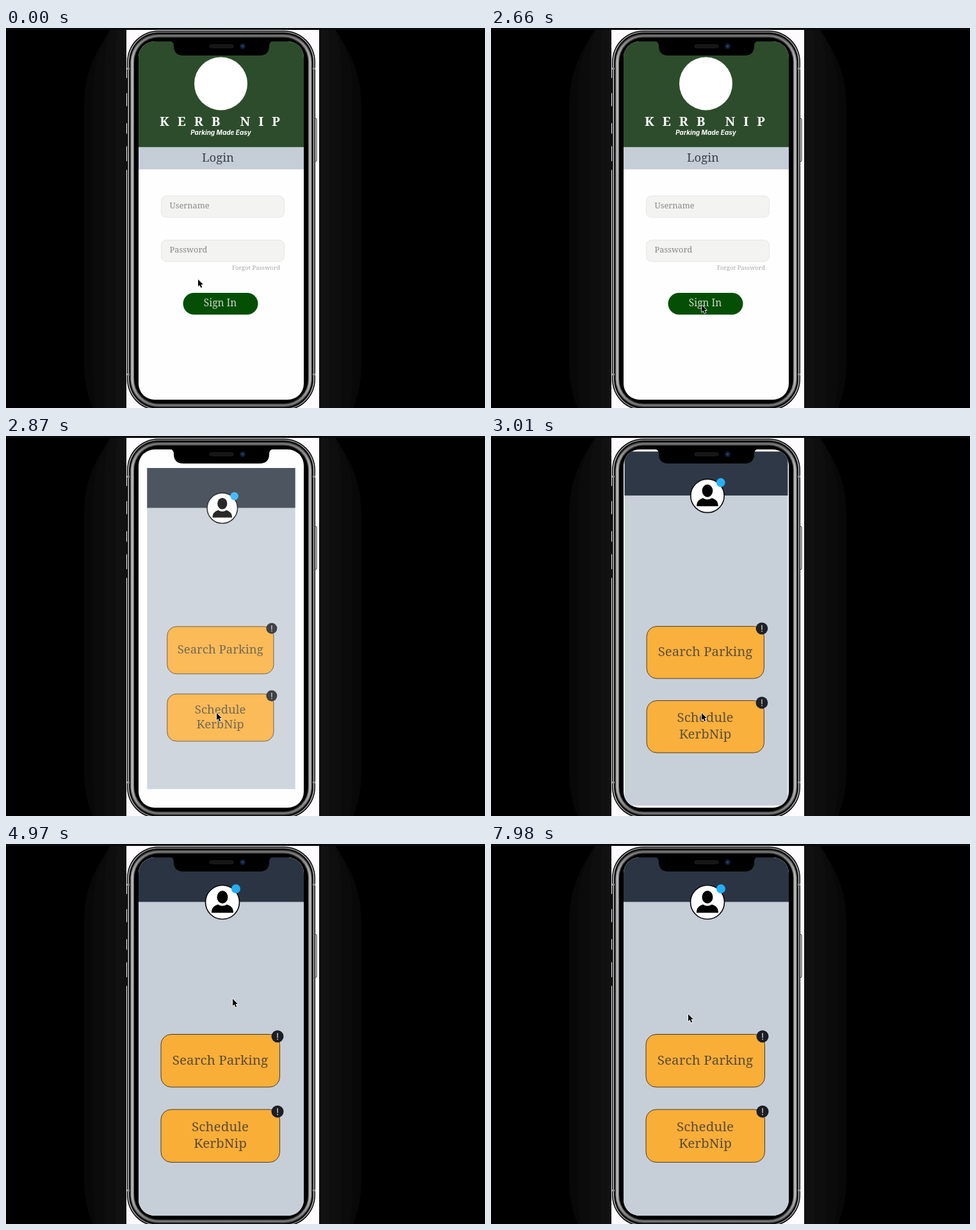
An HTML page with a canvas for the animation above (8 s loop, 748 px wide and 594 px high).

```html
<!DOCTYPE html>
<html lang="en">
<head>
<meta charset="utf-8">
<title>Parking app prototype</title>
<style>
  html, body { margin: 0; width: 100%; height: 100%; overflow: hidden; background: #000; }
  canvas { display: block; width: 748px; height: 594px; }
</style>
</head>
<body>
<canvas id="stage" width="748" height="594"></canvas>
<script>
const ctx = document.getElementById('stage').getContext('2d');
const LOOP = 8000, STEP = 70, SWITCH = 2800, POP = 343;
const SCREEN = { x: 207, y: 21, w: 258, h: 560, r: 25 };
const SERIF = '"Noto Serif", serif';

// Pointer tip: time, x, y
const PATH = [
  [0, 300, 393], [350, 300, 393], [1190, 370, 450], [2030, 350, 427],
  [2520, 350, 427], [2660, 329, 433], [3360, 329, 433], [4060, 312, 274],
  [4340, 304, 258], [4550, 304, 258], [5040, 357, 241], [6860, 357, 241],
  [7000, 336, 250], [7560, 310, 267], [7910, 310, 267], [7980, 308, 266]
];

function box(x, y, w, h, r, fill, stroke, line = 1) {
  ctx.beginPath();
  ctx.roundRect(x, y, w, h, r);
  paint(fill, stroke, line);
}

function disc(x, y, rx, fill, stroke, line, ry = rx) {
  ctx.beginPath();
  ctx.ellipse(x, y, rx, ry, 0, 0, Math.PI * 2);
  paint(fill, stroke, line);
}

function paint(fill, stroke, line) {
  if (fill) { ctx.fillStyle = fill; ctx.fill(); }
  if (stroke) { ctx.strokeStyle = stroke; ctx.lineWidth = line; ctx.stroke(); }
}

function text(str, x, y, font, fill, align = 'center') {
  ctx.font = font;
  ctx.fillStyle = fill;
  ctx.textAlign = align;
  ctx.fillText(str, x, y);
}

const serif = (size, weight = 300) => `${weight} ${size}px ${SERIF}`;

// Metal that is bright along the sides and dark at both ends
function metal(side, end) {
  const g = ctx.createLinearGradient(0, 4, 0, 598);
  g.addColorStop(0, end);
  g.addColorStop(0.08, side);
  g.addColorStop(0.92, side);
  g.addColorStop(1, end);
  return g;
}

function pointerAt(t) {
  const i = PATH.findIndex(p => p[0] > t);
  if (i < 0) return PATH[PATH.length - 1].slice(1);
  const [t0, x0, y0] = PATH[i - 1], [t1, x1, y1] = PATH[i];
  const k = (t - t0) / (t1 - t0), e = k * k * (3 - 2 * k);
  return [x0 + (x1 - x0) * e, y0 + (y1 - y0) * e];
}

function drawBackdrop() {
  ctx.fillStyle = '#000';
  ctx.fillRect(0, 0, 748, 594);
  [[0, '#080808'], [14, '#0b0b0b'], [32, '#0e0e0e'], [50, '#111']].forEach(([d, c]) =>
    box(122 + d, -60 - d, 433 - 2 * d, 767 + 2 * d, 180 - d, c));
  ctx.fillStyle = '#0b0b0b';
  ctx.fillRect(0, 0, 748, 3);
  ctx.fillStyle = '#fdfbfe';
  ctx.fillRect(188, 3, 301, 591);
}

function drawBody() {
  box(481.5, 141.5, 3.5, 67, 1.5, '#e4e4e4', '#222');
  [[78, 24], [122, 27], [165, 20], [208, 14]].forEach(([y, h]) => box(188, y, 2, h, 1, '#111'));
  const rims = [[0, '#0a0a0a'], [1.6, metal('#cfcfcf', '#8c8c8c')], [3, '#0c0c0c'],
    [5.5, metal('#8e8e8e', '#3a3a3a')], [7, metal('#bdbdbd', '#6a6a6a')],
    [9.5, metal('#777', '#2c2c2c')], [11, '#000']];
  rims.forEach(([d, c]) => box(189 + d, 4 + d, 294 - 2 * d, 594 - 2 * d, 49 - d, c));
  ctx.fillStyle = '#888';
  [62, 540].forEach(y => {
    ctx.fillRect(189, y, 4, 3);
    ctx.fillRect(479, y, 4, 3);
  });
}

function drawNotch() {
  ctx.beginPath();
  ctx.moveTo(255, 20);
  ctx.quadraticCurveTo(262, 21, 262, 28);
  ctx.quadraticCurveTo(262, 43, 277, 43);
  ctx.lineTo(396, 43);
  ctx.quadraticCurveTo(411, 43, 411, 28);
  ctx.quadraticCurveTo(411, 21, 418, 20);
  ctx.closePath();
  paint('#000');
  box(318, 26, 37, 5, 2.5, '#151515', '#222');
  disc(369.5, 28.5, 4.5, '#101a2e');
  disc(369.5, 28.5, 2, '#24406e');
}

function drawLogin() {
  ctx.fillStyle = '#fefefe';
  ctx.fillRect(207, 21, 258, 560);
  ctx.fillStyle = '#2d4c2b';
  ctx.fillRect(207, 21, 258, 165.5);
  ctx.fillStyle = '#c5cdd7';
  ctx.fillRect(207, 186.5, 258, 34.5);

  disc(335.5, 87, 41.5, '#fff');
  ctx.letterSpacing = '13px';
  text('KERB NIP', 240, 153, serif(20, 900), '#fff', 'left');
  ctx.letterSpacing = '0px';
  text('Parking Made Easy', 335.5, 166.5, 'italic 700 10px Inter, sans-serif', '#fff');
  text('Login', 331, 209, serif(18.5), '#3a4048');

  [[262.5, 'Username', 282], [331.5, 'Password', 351]].forEach(([y, label, base]) => {
    box(242.5, y, 192, 33.5, 8, '#f3f3f2', '#e6e6e5');
    text(label, 255.5, base, serif(12.8), '#888', 'left');
  });
  text('Forgot Password', 390.5, 378, serif(9.5), '#a8a8a8');
  box(276.5, 414, 117, 34, 17, '#054f05');
  text('Sign In', 334.5, 435, serif(15.5), '#c9d8c6');
}

function drawCard(y, lines, base) {
  box(242, y, 185.5, 82.5, 16, '#f9ae38', '#4a3a20');
  lines.forEach((s, i) => text(s, 334.5, base + i * 26, serif(20.7), '#5c4c36'));
  disc(424, y + 3.3, 9.5, '#1b1e22');
  ctx.fillStyle = '#e0e0e0';
  ctx.fillRect(423.4, y - 2, 1.3, 7.5);
  ctx.fillRect(423.3, y + 7, 1.5, 1.5);
}

function drawHome() {
  ctx.fillStyle = '#c6ced8';
  ctx.fillRect(207, 21, 258, 560);
  ctx.fillStyle = '#2b3442';
  ctx.fillRect(207, 21, 258, 69.5);

  disc(338, 91, 26.5, '#fff', '#0a0a0a', 1.7);
  disc(338, 83, 8.5, '#000', null, 0, 10);
  ctx.beginPath();
  ctx.moveTo(321, 107.5);
  ctx.bezierCurveTo(321, 100, 324, 97, 331, 94.5);
  ctx.quadraticCurveTo(338, 99, 345, 94.5);
  ctx.bezierCurveTo(352, 97, 355, 100, 355, 107.5);
  ctx.closePath();
  paint('#000');
  disc(359, 70, 7, '#22aefc');

  drawCard(297.5, ['Search Parking'], 344.5);
  drawCard(415, ['Schedule', 'KerbNip'], 449);
}

function drawScreen(t) {
  const { x, y, w, h, r } = SCREEN;
  ctx.save();
  ctx.beginPath();
  ctx.roundRect(x, y, w, h, r);
  ctx.clip();
  if (t < SWITCH) {
    drawLogin();
  } else {
    const left = Math.max(0, 1 - (t - SWITCH) / POP) ** 3;
    const scale = 1 - 0.206 * left;
    ctx.fillStyle = '#fefefe';
    ctx.fillRect(x, y, w, h);
    ctx.translate(336, 301);
    ctx.scale(scale, scale);
    ctx.translate(-336, -301);
    drawHome();
    // White veil, so the page fades in as one layer
    ctx.globalAlpha = 0.32 * left;
    ctx.fillStyle = '#fefefe';
    ctx.fillRect(x, y, w, h);
  }
  ctx.restore();
}

function drawPointer(x, y) {
  ctx.save();
  ctx.translate(x, y);
  ctx.beginPath();
  [[0, 0], [0, 11], [2.5, 8.8], [4.3, 13], [6.2, 12.2], [4.4, 8.1], [7.8, 8.1]]
    .forEach(([px, py]) => ctx.lineTo(px, py));
  ctx.closePath();
  ctx.lineJoin = 'round';
  paint(null, '#fff', 1.6);
  paint('#000');
  ctx.restore();
}

function draw(now) {
  const t = Math.floor((now % LOOP) / STEP) * STEP;
  drawBackdrop();
  drawBody();
  drawScreen(t);
  drawNotch();
  drawPointer(...pointerAt(t));
}

const start = performance.now();
function tick() {
  draw(performance.now() - start);
  requestAnimationFrame(tick);
}
tick();
</script>
</body>
</html>
```
